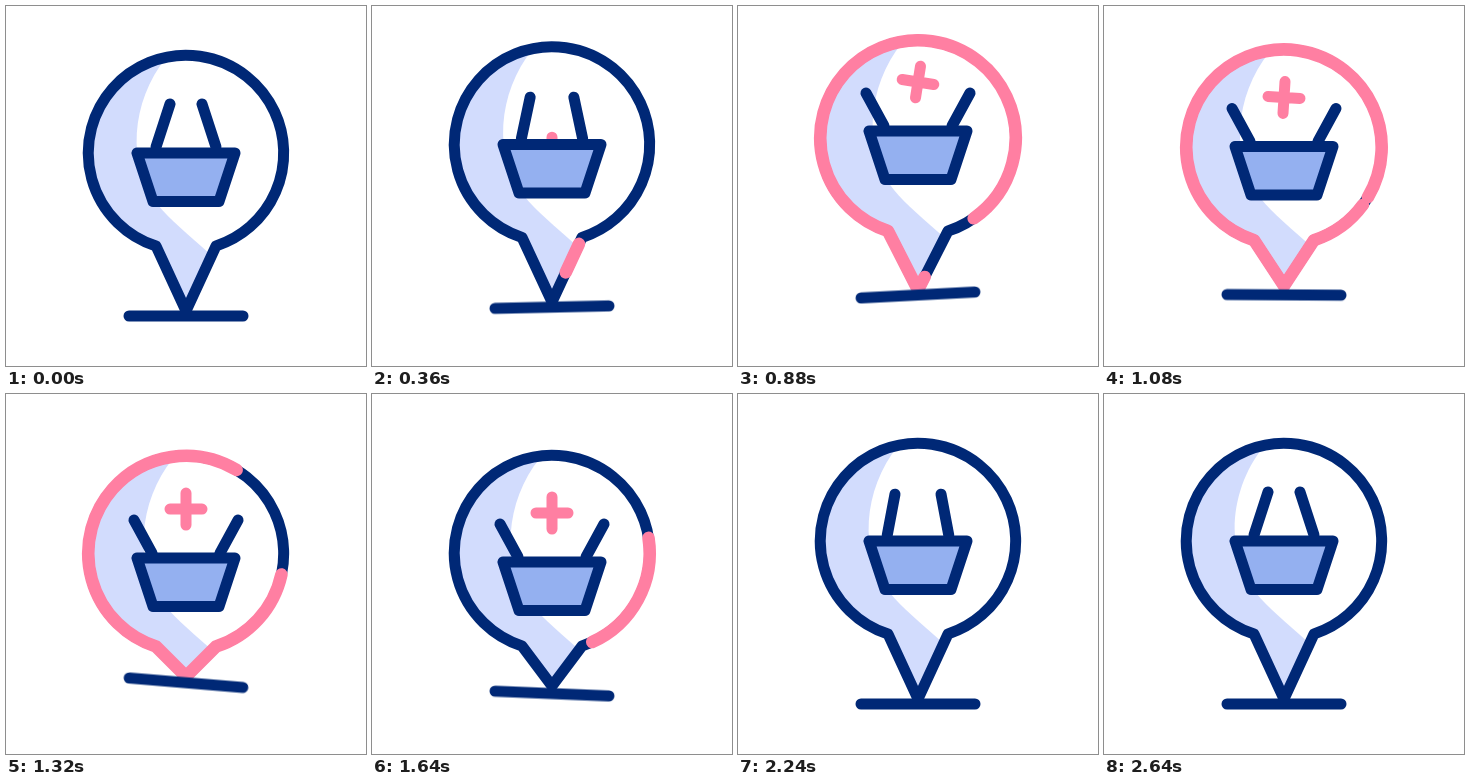
These frames come from a looping animation (360 by 360 pixels, 3 s). An HTML page without scripts:

```html
<!DOCTYPE html>
<html lang="en">
<head>
<meta charset="utf-8">
<title>Shopping pin</title>
<style>
  @property --lead { syntax: "<number>"; inherits: false; initial-value: 0; }
  @property --trail { syntax: "<number>"; inherits: false; initial-value: 0; }
  @property --drift { syntax: "<number>"; inherits: false; initial-value: 33; }

  html, body { margin: 0; width: 100%; height: 100%; overflow: hidden; background: #fff; }
  svg { display: block; width: 100%; height: 100%; }

  .line { fill: none; stroke: #002876; stroke-width: 11; stroke-linecap: round; stroke-linejoin: round; }
  .pink { stroke: #ff7fa2; }
  .fill { fill: #d2dcfd; }
  .white { fill: #fff; }

  .head, .white, .pin, .basket, .handle, .plus, .base { animation: 3s linear infinite; }
  .head { animation-name: head; }
  .white { animation-name: shade; }
  .pin { animation-name: tip; }
  .basket { animation-name: basket; }
  .handle { animation-name: handle; }
  .plus { animation-name: plus, sway; transform-origin: 180px 172px; }
  .base { animation-name: base; transform-origin: 180px 310px; }

  /* The pink run travels backwards along the outline, its tail following its lead. */
  .run {
    stroke-width: 12.6;
    stroke-dasharray: calc((var(--lead) - var(--trail)) * 1px) calc((100 - var(--lead) + var(--trail)) * 1px);
    stroke-dashoffset: calc((var(--lead) - var(--drift)) * 1px);
    animation-name: tip, lead, trail, drift, show;
  }

  @keyframes lead {
    0%, 5.333% { --lead: 0; animation-timing-function: cubic-bezier(.6, 0, .4, 1); }
    40%, 100% { --lead: 102; }
  }
  @keyframes trail {
    0%, 31.333% { --trail: 0; animation-timing-function: cubic-bezier(.6, 0, .4, 1); }
    66% { --trail: 98; }
    70%, 100% { --trail: 102; }
  }
  @keyframes drift {
    0%, 5.333% { --drift: 33; }
    68%, 100% { --drift: -1; }
  }
  @keyframes show {
    0%, 5.8% { visibility: hidden; }
    5.81%, 69.9% { visibility: visible; }
    70%, 100% { visibility: hidden; }
  }

  @keyframes head {
    0%, 5.333% { translate: 0 0; animation-timing-function: ease-in-out; }
    18.667%, 24% { translate: 0 -17px; }
    29.333% { translate: 0 -15px; }
    36.667% { translate: 0 -5px; }
    41.333% { translate: 0 5px; }
    44% { translate: 0 12.5px; animation-timing-function: ease-out; }
    49.333% { translate: 0 16px; animation-timing-function: ease-in; }
    54.667% { translate: 0 12px; }
    60% { translate: 0 3.5px; animation-timing-function: ease-out; }
    64%, 100% { translate: 0 0; }
  }
  @keyframes tip {
    0%, 5.333% { d: path("M268.5 105.7A97.7 97.7 0 0 1 210 240L180 305L150 240A97.7 97.7 0 1 1 268.5 105.7Z"); }
    18.667% { d: path("M268.5 105.7A97.7 97.7 0 0 1 210 240L180 304L150 240A97.7 97.7 0 1 1 268.5 105.7Z"); }
    29.333% { d: path("M268.5 105.7A97.7 97.7 0 0 1 210 240L180 299L150 240A97.7 97.7 0 1 1 268.5 105.7Z"); }
    44%, 49.333% { d: path("M268.5 105.7A97.7 97.7 0 0 1 210 240L180 270L150 240A97.7 97.7 0 1 1 268.5 105.7Z"); }
    54.667% { d: path("M268.5 105.7A97.7 97.7 0 0 1 210 240L180 280L150 240A97.7 97.7 0 1 1 268.5 105.7Z"); }
    63%, 100% { d: path("M268.5 105.7A97.7 97.7 0 0 1 210 240L180 305L150 240A97.7 97.7 0 1 1 268.5 105.7Z"); }
  }
  @keyframes shade {
    0%, 5.333% { translate: 0 0; }
    18.667% { translate: 1px 0; }
    29.333% { translate: 4px 0; }
    44% { translate: 7px 0; }
    54.667% { translate: 8px 0; }
    66%, 100% { translate: 0 0; }
  }
  @keyframes basket {
    0%, 5.333% { translate: 0 0; animation-timing-function: ease-in-out; }
    18.667% { translate: 0 -17px; animation-timing-function: ease-out; }
    26%, 29.333% { translate: 0 -22px; animation-timing-function: ease-in; }
    36.667% { translate: 0 -4px; }
    44% { translate: 0 17px; animation-timing-function: ease-out; }
    49.333% { translate: 0 22px; }
    54.667% { translate: 0 21px; animation-timing-function: ease-in-out; }
    66.667% { translate: 0 2px; }
    70%, 100% { translate: 0 0; }
  }
  @keyframes handle {
    0%, 5.333% { d: path("M150 141L164 98"); animation-timing-function: ease-in-out; }
    29.333%, 62.667% { d: path("M146 142L128 109"); animation-timing-function: ease-in-out; }
    80%, 100% { d: path("M150 141L164 98"); }
  }
  @keyframes plus {
    0%, 5.333% { translate: 0 0; animation-timing-function: ease-in-out; }
    26%, 58.667% { translate: 0 -74px; animation-timing-function: ease-in-out; }
    77.333%, 100% { translate: 0 0; }
  }
  @keyframes sway {
    0%, 18.667% { rotate: 0deg; animation-timing-function: ease-in-out; }
    29.333% { rotate: 9deg; animation-timing-function: ease-in-out; }
    41.333%, 100% { rotate: 0deg; }
  }
  @keyframes base {
    0%, 5.333% { transform: translateY(0) rotate(0deg); animation-timing-function: ease-in-out; }
    18.667% { transform: translateY(-17.5px) rotate(-2.5deg); animation-timing-function: ease-out; }
    29.333% { transform: translateY(-21px) rotate(-3deg); animation-timing-function: ease-in-out; }
    44% { transform: translateY(-21.3px) rotate(4.75deg); }
    54.667% { transform: translateY(-10.5px) rotate(2.4deg); }
    60% { transform: translateY(-2.5px) rotate(.5deg); animation-timing-function: ease-out; }
    63%, 100% { transform: translateY(0) rotate(0deg); }
  }
</style>
</head>
<body>
<svg viewBox="0 0 360 360">
  <g class="head">
    <path class="pin fill"/>
    <path class="white" d="M160 52C125 95 120 160 152 199C163 213 182 228 206 250H300V36H160Z"/>
    <path class="pin line"/>
    <path class="pin line pink run" pathLength="100"/>
  </g>
  <g class="basket">
    <path class="plus line pink" d="M164 172H196M180 156V188"/>
    <path class="handle line"/>
    <path class="handle line" transform="matrix(-1 0 0 1 360 0)"/>
    <path class="line" style="fill:#94b0f0" d="M131 147H229L213 195.500H147Z"/>
  </g>
  <path class="base line" d="M123 310H237"/>
</svg>
</body>
</html>
```
